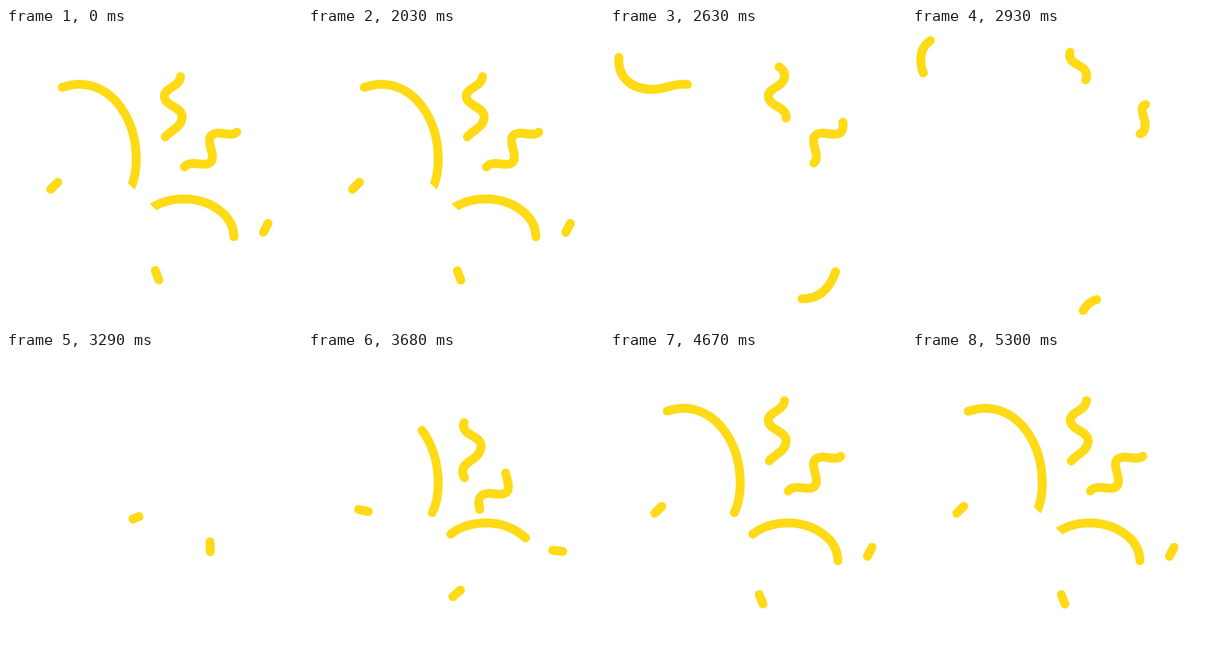
Write an HTML page that moves like this. It is 400x400 px and loops after 5.33 s.

```html
<!DOCTYPE html>
<html lang="en">
<head>
<meta charset="utf-8">
<title>Confetti burst</title>
<style>
  html, body { margin: 0; width: 100%; height: 100%; overflow: hidden; background: #fff; }
  svg { display: block; width: 100vw; height: 100vh; }
  path { fill: none; stroke: #ffda16; stroke-width: 12; stroke-linecap: round; }
  #rim { stroke: #fff; stroke-width: 16; stroke-linecap: butt; }
</style>
</head>
<body>
<svg viewBox="0 0 400 400">
  <g id="streamers"></g>
  <path id="rim" d="M134.5 191.8L219.5 272.8"/>
  <g id="dots"></g>
</svg>
<script>
const LOOP = 5330, STEP = 30;
const EXIT = 2030, EXIT_END = 3120, ENTER = 3290, ENTER_TIME = 1750;
const EXIT_KEY = 2630, ENTER_KEY = 3680;

const $ = id => document.getElementById(id);
const clamp = x => Math.max(0, Math.min(1, x));
const exitU = t => clamp((t - EXIT) / (EXIT_END - EXIT));
const enterU = (t, start = ENTER) => clamp((t - start) / ENTER_TIME);

function addPath(parent, d) {
  const path = document.createElementNS('http://www.w3.org/2000/svg', 'path');
  path.setAttribute('d', d);
  return $(parent).appendChild(path);
}

// Distance along the path of the point closest to (x, y).
function lengthAt(path, [x, y]) {
  let best = 0, least = Infinity;
  for (let s = 0; s <= path.getTotalLength(); s += 0.5) {
    const p = path.getPointAtLength(s), d = Math.hypot(p.x - x, p.y - y);
    if (d < least) { least = d; best = s; }
  }
  return best;
}

// Power eases whose exponents make the trim pass through its key points.
function trimMotion(path, points) {
  const total = path.getTotalLength();
  const [rest, out, back] = points.map(p => lengthAt(path, p));
  const p = Math.log((out - rest) / (total - rest)) / Math.log(exitU(EXIT_KEY));
  const n = Math.log(1 - back / rest) / Math.log(1 - enterU(ENTER_KEY));
  return t => {
    if (t < EXIT) return rest;
    if (t < ENTER) return rest + (total - rest) * exitU(t) ** p;
    return rest ? rest * (1 - (1 - enterU(t)) ** n) : 0;
  };
}

// tail and head: [at rest, while leaving, while entering]
const streamers = [
  { d: 'M168 217C173 207 176 193 176 178C176 125 146 76 98 76C84 76 73 83 58 83C28 83 10 66 12 40C13 26 22 14 39 12',
    tail: [[168, 217], [105, 76], [168, 217]], head: [[76, 79], [12, 40], [156, 105]], drift: [0, 0] },
  { d: 'M193 246C206 236 224 231 241 231C262 231 281 239 295 252C303 260 308 270 308 283C309 300 309 315 305 329C298 350 285 366 260 366C240 365 228 380 226 400',
    tail: [[193, 246], [305, 329], [193, 246]], head: [[308, 282], [260, 366], [294, 251]], drift: [0, 0] },
  { d: 'M238 188C238 172 213 172 213 154C213 140 238 138 238 120C238 106 214 106 214 92C214 80 236 80 236 64C236 50 213 50 213 37C213 25 226 24 226 12',
    tail: [[216, 148], [238, 122], [218, 161]], head: [[236, 66], [228, 54], [215, 89]], drift: [44, -78] },
  { d: 'M228 222C240 221 241 211 240 203C236 188 243 183 254 183C262 183 279 189 279 174C279 165 275 161 275 152C275 145 280 142 288 142C296 142 315 150 315 131C315 122 311 118 311 110C311 103 318 102 326 102C332 102 337 103 341 104',
    tail: [[240, 187], [275, 182], [241, 205]], head: [[311, 141], [315, 128], [275, 156]], drift: [89, -89] }
].map(s => {
  const path = addPath('streamers', s.d);
  return { path, drift: s.drift, tail: trimMotion(path, s.tail), head: trimMotion(path, s.head) };
});

const dots = [
  { from: [185, 225], to: [65.2, 213.2], angle: -45, start: 3275, ease: 9.5, spin: 212, spinEase: 5 },
  { from: [207, 257], to: [351, 270], angle: -63, start: 3110, ease: 6, spin: -626, spinEase: 4.4 },
  { from: [168, 247], to: [204.2, 334.2], angle: 69, start: 3290, ease: 9.5, spin: -319, spinEase: 4.2 }
].map(dot => ({ ...dot, path: addPath('dots', 'M-6.8 0H6.8') }));

function drawStreamer({ path, tail, head, drift }, t) {
  const from = tail(t), length = head(t) - from;
  const late = t < ENTER ? 0 : (1 - enterU(t)) ** 9.5;
  path.style.display = length > 0.5 ? '' : 'none';
  path.setAttribute('stroke-dasharray', `${Math.max(0, length)} 9999`);
  path.setAttribute('stroke-dashoffset', -from);
  path.setAttribute('transform', `translate(${-drift[0] * late} ${-drift[1] * late})`);
}

function drawDot({ path, from, to, angle, start, ease, spin, spinEase }, t) {
  let travel = 0, turn = 0, stretch = 1;
  if (t >= start) {
    const u = enterU(t, start);
    travel = -((1 - u) ** ease);
    turn = spin * (1 - u) ** spinEase;
    stretch = Math.min(1, 0.7 + 12 * u);
  } else if (t >= EXIT) {
    travel = 0.95 * ((t - 2000) / 540) ** 2;
    turn = -Math.sign(spin) * 120 * travel;
  }
  const [x, y] = to.map((v, i) => v + (v - from[i]) * travel);
  path.style.display = travel > 2 || t === start ? 'none' : '';
  path.setAttribute('transform', `translate(${x} ${y}) rotate(${angle + turn}) scale(${stretch} 1)`);
}

// The white rim of the popper hides the streamers' tails.
function drawRim(t) {
  let away = 0;
  if (t >= ENTER) away = 45 * (Math.max(0, 5300 - t) / 1140) ** 1.6;
  else if (t >= EXIT) away = 200 * ((t - EXIT) / 500) ** 2;
  $('rim').setAttribute('transform', `translate(${-0.689 * away} ${0.725 * away})`);
}

function draw(t) {
  streamers.forEach(s => drawStreamer(s, t));
  drawRim(t);
  dots.forEach(dot => drawDot(dot, t));
}

const began = performance.now();
function frame() {
  const t = (performance.now() - began) % LOOP;
  draw(t < EXIT ? 0 : EXIT + Math.floor((t - EXIT) / STEP) * STEP);
  requestAnimationFrame(frame);
}
frame();
</script>
</body>
</html>
```
